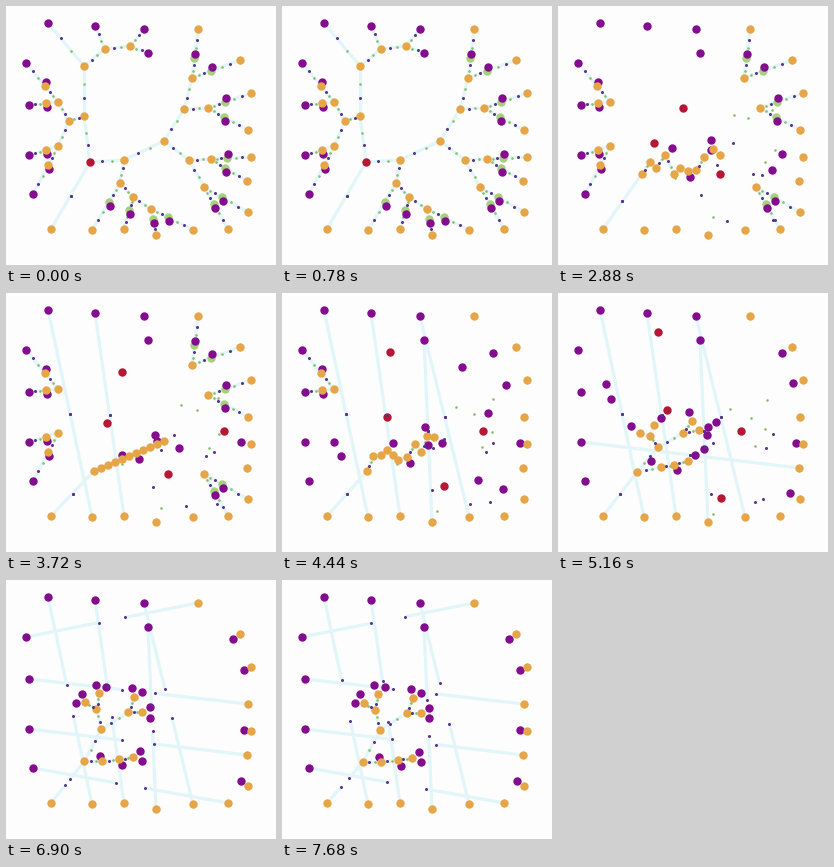
These frames come from a looping animation (270 px wide and 259 px high, 7740 ms). A matplotlib script:

```python
import numpy as np
import matplotlib.pyplot as plt
from matplotlib.animation import FuncAnimation
from matplotlib.collections import LineCollection

W, H, DPI = 270, 259, 100
FRAMES, INTERVAL = 129, 60
PX = 72 / DPI
COLORS = dict(green="#a6d07c", purple="#840c8e", orange="#e6a648", red="#b51835")

# fixed terminals: input k finally joins output k
inputs = np.array([(42, 17), (89, 20), (138, 23), (142, 47),
                   (23, 149), (20, 57), (23, 99), (27, 188)])
outputs = np.array([(86, 224), (118, 223), (187, 224), (150, 229),
                    (241, 175), (192, 23), (242, 124), (222, 223),
                    (234, 54), (245, 87), (245, 151), (242, 206)])
base = np.array([45, 223])
IN_HUBS, OUT_HUBS = "pqrronno", "ijkkgdehdegh"
IN_HUBS = "pqrr" + "onno"

# opening tree: hub -> position and parent
ROOT = np.array([84, 156])
TREE = dict(
    a=(118, 154, ""), b=(158, 135, "a"), c=(178, 103, "b"), d=(186, 72, "c"),
    e=(202, 102, "c"), f=(183, 154, "b"), g=(205, 153, "f"), h=(198, 181, "f"),
    i=(114, 177, "a"), j=(127, 191, "i"), k=(145, 203, "j"), l=(78, 110, ""),
    m=(63, 115, "l"), n=(52, 96, "m"), o=(52, 140, "m"), p=(78, 60, "l"),
    q=(99, 43, "p"), r=(124, 40, "q"))
START = {name: np.array(v[:2]) for name, v in TREE.items()}
# moment at which a hub lets go of what hangs on it
LEAVE = dict(i=20, j=20, k=20, r=45, g=42, d=66, e=66, h=66, o=66, n=78, p=24, q=24)

# closing tree, from left to right, with parent index
FINAL = np.array([(81, 182), (82, 123), (93, 130), (96, 114), (98, 150), (99, 182),
                  (116, 180), (125, 133), (130, 178), (131, 118), (139, 133)])
PARENT = [4, 2, 4, 2, 4, 0, 5, 4, 6, 7, 7]

LEAF_HUBS = "deghnor"
STEMS = sorted(set(TREE) - set(LEAF_HUBS), key=lambda s: START[s][0])
UNLINK, RELINK = 40, 84


def ease(t, a, b):
    u = np.clip((t - a) / (b - a), 0, 1)
    return u * u * (3 - 2 * u)


def mix(a, b, u):
    return a + (b - a) * u


def polar(r, angle):
    return r * np.array([np.cos(angle), np.sin(angle)])


def stem_at(rank, t):
    """Tree position, then a slanted row, then the closing cluster."""
    row = np.array([88 + 7 * rank, 178 - 3 * rank])
    goal = FINAL[rank] - np.array([7, 2]) * (1 - ease(t, 96, 128))
    p = mix(START[STEMS[rank]], row, ease(t, 13, 60))
    return mix(p, goal, ease(t, 62, 102))


def purple_slots():
    """Two per leaf of the closing tree, one per inner link of its lower arm."""
    slots = []
    for i, p in enumerate(PARENT):
        if i not in PARENT:
            out = np.arctan2(*(FINAL[i] - FINAL[p])[::-1])
            slots += [(i, polar(9.5, out + s)) for s in (-0.6, 0.6)]
    slots += [(5, polar(6, -2)), (6, polar(6.5, 1.1))]
    return sorted(slots, key=lambda s: FINAL[s[0]][0] + s[1][0])


class Gadget:
    """A purple agent and its companion, hung between terminal and hub."""

    def __init__(self, terminal, hub, kind):
        self.terminal, self.hub, self.kind = terminal, hub, kind
        self.leave = LEAVE[hub]
        self.slot = None
        self.mate = mix(terminal, START[hub], 0.6)
        side = np.sign(terminal[1] - START[hub][1])
        self.home = self.mate + np.array([1, 4 * side])

    def purple(self, t, stems):
        if self.slot:
            rank, offset = self.slot
            goal = stems[rank] + offset
        else:
            goal = self.terminal + np.array([-7.5, (130 - self.terminal[1]) / 14])
        return mix(self.home, goal, ease(t, self.leave, self.leave + 26))


gadgets = [Gadget(p, h, "green") for p, h in zip(outputs, OUT_HUBS)]
gadgets += [Gadget(p, h, "orange") for p, h in zip(inputs[4:], IN_HUBS[4:])]
travellers = sorted(gadgets[:8] + gadgets[12:], key=lambda g: g.home[0])
for g, slot in zip(travellers, purple_slots()):
    g.slot = slot

# red agents: first and last moment, path
REDS = [(0, 94, ROOT, (112, 113)), (24, 94, (141, 141), (95, 26)),
        (24, 94, (161, 144), (163, 213)), (50, 94, (235, 138), (172, 138))]

rng = np.random.default_rng(4)
debris = rng.uniform((95, 95), (215, 220), (14, 2))
drift = rng.normal(0, 0.35, (14, 2))

fig = plt.figure(figsize=(W / DPI, H / DPI), dpi=DPI, facecolor="#fdfdfd")
ax = fig.add_axes([0, 0, 1, 1])
ax.set(xlim=(0, W), ylim=(H, 0))
ax.axis("off")

wires = LineCollection([], colors="#e2f6f9", linewidths=3.2 * PX, zorder=1)
ax.add_collection(wires)


def dots(color, radius, z):
    return ax.scatter([], [], s=(2 * radius * PX) ** 2, color=color,
                      linewidths=0, zorder=z)


nodes = {k: dots(c, 4.2, 4 + i) for i, (k, c) in enumerate(COLORS.items())}
dark_ports = dots("#55308c", 1.5, 9)
light_ports = dots("#86bd70", 1.3, 3)


def place(artist, pts):
    artist.set_offsets(np.reshape(pts, (-1, 2)))


def draw(t):
    stems = [stem_at(i, t) for i in range(len(STEMS))]
    hubs = dict(zip(STEMS, stems))
    hubs.update({h: START[h] for h in LEAF_HUBS if t < LEAVE[h]})
    reds = [mix(np.array(a), np.array(b), (max(t, 13) - max(t0, 13)) / (t1 - max(t0, 13)))
            for t0, t1, a, b in REDS if t0 <= t < t1]
    pts = dict(green=[], red=reds, purple=list(inputs),
               orange=[*outputs, base, *hubs.values()])

    # links between hubs follow the tree, the row, then the new tree
    if t < UNLINK:
        links = [(hubs[TREE[h][2]] if TREE[h][2] else reds[0], p)
                 for h, p in hubs.items()]
    elif t < RELINK:
        links = list(zip(stems, stems[1:]))
    else:
        links = [(stems[p], stems[i]) for i, p in enumerate(PARENT) if i != 4]

    for g in gadgets:
        p = g.purple(t, stems)
        pts["purple"].append(p)
        if t < g.leave:
            pts[g.kind].append(g.mate)
            links += [(g.terminal, g.mate), (g.mate, hubs[g.hub])]
    links += [(p, hubs[h]) for p, h in zip(inputs[:4], IN_HUBS) if t < LEAVE[h]]

    # long strands, which part in the middle near the end
    strands = [(a, b) for k, (a, b) in enumerate(zip(inputs, outputs))
               if t >= 52 + 7.1 * k]
    if t < 30:
        strands.append((base, reds[0]))
    elif t >= 48:
        strands.append((base, stems[0]))

    reach = np.interp(t, [90, 102, 128], [0.5, 0.452, 0.4])
    segs, dark, light = [], [], []
    for a, b in strands:
        m, n = mix(a, b, reach), mix(b, a, reach)
        segs += [(a, m), (b, n)]
        dark += [m, n]
    for a, b in links:
        segs.append((a, b))
        if np.hypot(*(b - a)) > 13:
            dark.append(mix(a, b, 0.36))
            light.append(mix(a, b, 0.64))
    if 46 <= t < 94:
        loose = debris + drift * (t - 62)
        dark += list(loose[::2])
        light += list(loose[1::2])

    wires.set_segments(segs)
    place(dark_ports, dark)
    place(light_ports, light)
    for kind, artist in nodes.items():
        place(artist, pts[kind])
    return [wires, dark_ports, light_ports, *nodes.values()]


anim = FuncAnimation(fig, draw, frames=FRAMES, interval=INTERVAL,
                     repeat=True, repeat_delay=0, blit=False)
plt.show()
```
